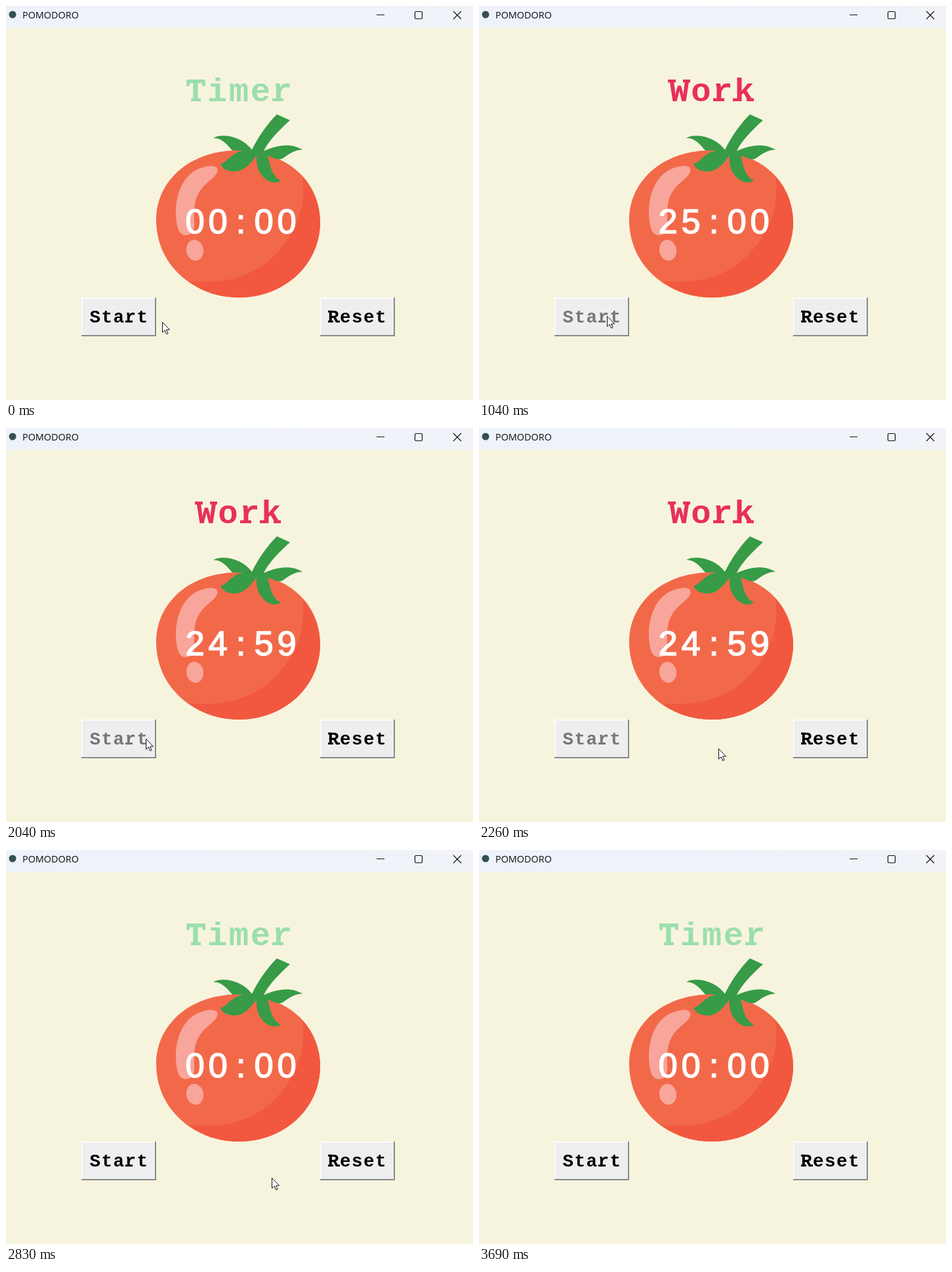
An HTML page that plays this animation: 712 px wide and 600 px high, repeating every 3720 ms.

```html
<!DOCTYPE html>
<html lang="en">
<head>
<meta charset="utf-8">
<title>POMODORO</title>
<style>
  html, body { margin: 0; width: 100%; height: 100%; overflow: hidden; background: #f7f4de; }
  svg { display: block; }
  text { text-anchor: middle; }
  .mono { font-family: "Liberation Mono", monospace; font-weight: bold; letter-spacing: .052em; }
  .caption { font: 14.4px "Open Sans", sans-serif; text-anchor: start; fill: #111; }
  #heading { font-size: 50.6px; }
  #clock { font: 52.5px "Liberation Sans", sans-serif; fill: #fff; stroke: #fff; stroke-width: 1.5; }
  .button { font-size: 27.6px; }
  .button .back { fill: #858b8a; }
  .button .lip { fill: #fff; }
  .button .face { fill: #efeeee; }
  .button.pressed .back { fill: #fff; }
  .button.pressed .lip { fill: #858b8a; }
  .button.pressed .label { transform: translate(1px, 1px); }
  .button.disabled .label { fill: #777; stroke: #777; }
  .label { fill: #000; stroke: #000; }
  .label text { stroke: none; }
  .label path { fill: none; stroke-width: 3; }
  #slabs { fill: none; stroke-width: 4.5; }
</style>
</head>
<body>
<svg width="712" height="600" viewBox="0 0 712 600">
  <defs>
    <linearGradient id="bar">
      <stop offset="0" stop-color="#edf2fb"/>
      <stop offset="1" stop-color="#f1f3f9"/>
    </linearGradient>
  </defs>
  <rect width="712" height="600" fill="#f7f4de"/>

  <rect width="712" height="33" fill="url(#bar)"/>
  <circle cx="10" cy="13" r="5.5" fill="#34504f"/>
  <text class="caption" x="25" y="19">POMODORO</text>
  <g fill="none" stroke="#111" stroke-width="1.2">
    <path d="M565 13.5h12M682 8l12 12M694 8l-12 12"/>
    <rect x="623.5" y="8.5" width="11" height="11" rx="1.5"/>
  </g>

  <g id="title">
    <text id="heading" class="mono" x="356.2" y="145"></text>
    <path id="slabs"/>
  </g>

  <path fill="#f26949" d="M354 220C430 221 479 268 479 329C479 394 424 444 355 444C286 444 229 394 229 326C229 262 286 219 354 220Z"/>
  <path fill="#f2583f" d="M452 260C459 310 439 352 405 384C370 416 325 423 279 419C300 436 327 444 355 444C424 444 479 394 479 329C479 305 469 279 452 260Z"/>
  <g fill="#f8a59b">
    <path d="M320 245C312 241 297 245 286 252C268 264 258 290 259 318C260 338 264 349 274 349C285 349 288 340 287 328C286 305 288 290 300 276C309 266 318 262 322 253C323 249 322 246 320 245Z"/>
    <ellipse cx="288" cy="372" rx="13" ry="16" transform="rotate(-10 288 372)"/>
  </g>
  <path fill="#379b47" d="M413 165L433 174C415 190 399 207 393 221C412 212 434 208 452 219C440 219 432 225 422 232C414 236 409 231 399 228C403 242 404 258 419 266C411 271 400 269 392 260C384 252 381 240 382 228C372 240 364 252 348 252C337 252 329 247 327 240C336 240 340 226 361 220L345 220C338 212 330 201 316 201C330 193 360 199 375 219C384 200 398 180 413 165Z"/>
  <text id="clock" x="288 323 358 393 428" y="345.5"></text>

  <g id="start" class="button">
    <rect class="back" x="115" y="444" width="114" height="59"/>
    <rect class="lip" x="115" y="444" width="112" height="57"/>
    <rect class="face" x="116.5" y="445.5" width="110.5" height="55.5"/>
    <g class="label">
      <text class="mono" x="172.5" y="482">Start</text>
      <path d="M182 480.5h11"/>
    </g>
  </g>
  <g id="reset" class="button">
    <rect class="back" x="479" y="444" width="114" height="59"/>
    <rect class="lip" x="479" y="444" width="112" height="57"/>
    <rect class="face" x="480.5" y="445.5" width="110.5" height="55.5"/>
    <g class="label">
      <text class="mono" x="536" y="482">Reset</text>
      <path d="M491 480.5h8M491 465.3h6M504 480.5h5"/>
    </g>
  </g>

  <path id="cursor" d="M.5.5V16.2L4.2 12.8L6.6 18.6L9 17.6L6.6 12H11.5Z" fill="#fff" stroke="#111"/>
</svg>
<script>
const LOOP = 3720;
const PRESS_START = 960, WORK = 1040, TICK = 2040, PRESS_RESET = 2640, RESET = 2690, EXIT = 3690;

// Cursor moves: begin, end, from, to, sideways dip of the path
const moves = [
  [10, 350, [238, 481], [195, 472], 0],
  [1235, 1370, [195, 472], [206, 473], 0],
  [1535, 1600, [206, 473], [213, 473], 0],
  [2040, 2500, [213, 473], [535, 479], 12],
  [2680, 2830, [535, 479], [405, 499], 0],
  [3150, 3670, [405, 499], [612, 597], 0],
];

// Slab serifs that complete the typewriter look of each heading
const headings = {
  Timer: { color: '#9bdeac', slabs: 'M277.5 112v10M301.5 112v10M282 142.7h15M406 142.7h17' },
  Work: { color: '#e7305b', slabs: 'M288 114.2h12M311 114.2h11M357 142.7h17M387 142.7h13M408 142.7h11' },
};

const el = id => document.getElementById(id);
const smooth = p => p * p * (3 - 2 * p);

function cursorAt(t) {
  const [begin, end, a, b, dip] = moves.findLast(m => t >= m[0]) || moves[0];
  const p = smooth(Math.min(1, Math.max(0, (t - begin) / (end - begin))));
  const x = a[0] + (b[0] - a[0]) * p;
  const y = a[1] + (b[1] - a[1]) * p + dip * 4 * p * (1 - p);
  return [Math.round(x), Math.round(y)];
}

function draw(t) {
  const working = t >= WORK && t < RESET;
  const name = working ? 'Work' : 'Timer';
  const { color, slabs } = headings[name];
  el('heading').textContent = name;
  el('title').setAttribute('fill', color);
  el('slabs').setAttribute('stroke', color);
  el('slabs').setAttribute('d', slabs);
  el('clock').textContent = !working ? '00:00' : t < TICK ? '25:00' : '24:59';
  el('start').classList.toggle('pressed', t >= PRESS_START && t < WORK);
  el('start').classList.toggle('disabled', working);
  el('reset').classList.toggle('pressed', t >= PRESS_RESET && t < RESET);
  el('cursor').setAttribute('transform', `translate(${cursorAt(t)})`);
  el('cursor').setAttribute('visibility', t < EXIT ? 'visible' : 'hidden');
}

const origin = performance.now();
function frame() {
  draw((performance.now() - origin) % LOOP);
  requestAnimationFrame(frame);
}
frame();
</script>
</body>
</html>
```
